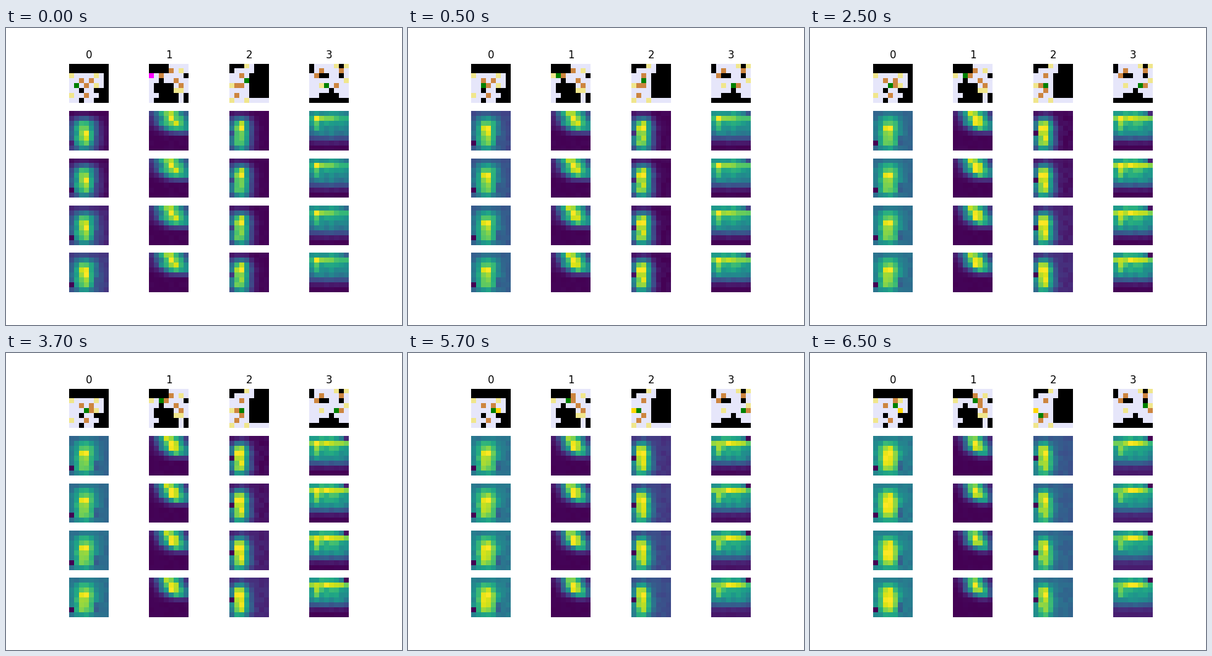
A matplotlib script that plays this animation: 640x480 px, repeating every 8000 ms.

```python
import numpy as np
import matplotlib.pyplot as plt
from matplotlib.animation import FuncAnimation
from matplotlib.colors import to_rgb

SIZE = 8
LAYERS = 4
STATES = 5
LAST_STEP = STATES * LAYERS - 1
INTERVAL = 500
MOVES = {"U": (-1, 0), "D": (1, 0), "L": (0, -1), "R": (0, 1)}
ROWS, COLS = np.mgrid[:SIZE, :SIZE]

# Walls are (row, row end, col, col end); cells are written as row * 10 + col.
LEVELS = [
    dict(walls=[(0, 2, 0, 8), (2, 8, 7, 8), (5, 8, 6, 7), (5, 6, 5, 6),
                (7, 8, 5, 6), (5, 6, 2, 3), (7, 8, 2, 3)],
         boxes=[32, 34, 43, 63], goals=[20, 25, 45, 60], player=41, moves="RRRU"),
    dict(walls=[(0, 2, 0, 4), (2, 3, 7, 8), (3, 4, 2, 3), (4, 6, 1, 2),
                (4, 8, 2, 5), (6, 8, 5, 6), (7, 8, 1, 2), (6, 8, 7, 8)],
         boxes=[14, 22, 35, 46], goals=[20, 16, 55, 56], player=20, moves="RRRR"),
    dict(walls=[(0, 1, 0, 3), (1, 2, 0, 1), (0, 2, 5, 8), (2, 7, 4, 8)],
         boxes=[22, 41, 42, 61], goals=[3, 40, 70, 73], player=33, moves="LDLD"),
    dict(walls=[(0, 2, 0, 1), (0, 1, 6, 7), (2, 3, 2, 4), (2, 3, 6, 7),
                (5, 6, 4, 5), (6, 7, 2, 6), (7, 8, 0, 8)],
         boxes=[12, 16, 21, 45], goals=[5, 7, 37, 42], player=43, moves="RRRU"),
]

# A heat map is a floor plus soft blobs, all drifting from a start to an end.
# Blob: (height, row, col, row spread, col spread).
FIELDS = [
    dict(ease=4, slant=0, floor=(.05, .33), blobs=[
        ((.85, 4.2, 2.5, 3.2, 2.5), (.52, 3.9, 2.7, 3.2, 2)),
        ((.15, 4.2, 3, .9, .9), (.12, 3, 2.4, .9, .9)),
        ((-.05, 5.5, 5, 1.2, .6), (-.2, 5.5, 5, 1.2, .6)),
        ((-.2, 6, 0, .6, .4), (-.44, 6, 0, .6, .4))]),
    dict(ease=1.5, slant=.5, floor=(.1, .06), blobs=[
        ((.78, 1.2, 4.4, 2.6, 3.2), (.75, 1.2, 4.4, 2.3, 2.2)),
        ((.12, 1.2, 4, 1.5, .8), (.2, 1.2, 3.9, 1.4, .8)),
        ((.1, 2, 2, .6, .8), (.15, 2, 2.4, .6, .8))]),
    dict(ease=1, slant=0, floor=(.06, .33), blobs=[
        ((.8, 4.2, 1.7, 3.4, 2), (.52, 4.2, 1.7, 3.4, 1.7)),
        ((.18, 2.6, 1.8, 1, .8), (.15, 2.5, 1.4, 1, .8)),
        ((-.15, 4, 0, .6, .4), (-.52, 4, 0, .6, .4))]),
    dict(ease=2, slant=0, floor=(.06, .06), blobs=[
        ((.53, 1.8, 3.5, 3.6, 9), (.5, 1.8, 3.5, 3.4, 9)),
        ((.28, 1, 3.5, .9, 9), (.28, 1, 3.5, .9, 9)),
        ((.3, 2, 1, 1.6, .7), (.18, 2.5, 1, 1.4, .7)),
        ((.05, 1, 2.5, .8, 1.2), (.12, 1, 3.5, .8, 1.2)),
        ((-.05, 0, 7.2, .8, 1), (-.55, 0, 7.2, .8, 1))]),
]


def play(level, count):
    """Walk the player, pushing any box in the way."""
    row, col = divmod(level["player"], 10)
    boxes = {divmod(cell, 10) for cell in level["boxes"]}
    for move in level["moves"][:count]:
        dr, dc = MOVES[move]
        row, col = row + dr, col + dc
        if (row, col) in boxes:
            boxes.remove((row, col))
            boxes.add((row + dr, col + dc))
    return (row, col), boxes


def draw_level(level, count):
    image = np.empty((SIZE, SIZE, 3))
    image[:] = to_rgb("lavender")
    for top, bottom, left, right in level["walls"]:
        image[top:bottom, left:right] = to_rgb("black")
    goals = {divmod(cell, 10) for cell in level["goals"]}
    player, boxes = play(level, count)
    for cell in goals:
        image[cell] = to_rgb("khaki")
    for cell in boxes:
        image[cell] = to_rgb("gold" if cell in goals else "peru")
    image[player] = to_rgb("magenta" if player in goals else "green")
    return image


def blob(height, row, col, row_spread, col_spread, slant):
    """A bump with a flat-topped profile down and a round one across."""
    center = col + slant * (ROWS - row)
    return height * np.exp(-((ROWS - row) / row_spread) ** 4
                           - ((COLS - center) / col_spread) ** 2)


def draw_field(field, step, seed):
    mix = 1 - (1 - step / LAST_STEP) ** field["ease"]
    start, end = field["floor"]
    values = np.full((SIZE, SIZE), start + (end - start) * mix)
    for first, last in field["blobs"]:
        shape = np.array(first) * (1 - mix) + np.array(last) * mix
        values += blob(*shape, field["slant"])
    phase = np.random.default_rng(seed).uniform(0, 2 * np.pi, (SIZE, SIZE))
    values *= 1 + .07 * np.sin(phase + step * .25)
    return (values - values.min()) / np.ptp(values)


fig, axes = plt.subplots(1 + LAYERS, len(LEVELS), figsize=(6.4, 4.8), dpi=100)
images = []
for index, column in enumerate(axes.T):
    column[0].set_title(str(index))
    images.append([ax.imshow(np.zeros((SIZE, SIZE)), cmap="viridis", vmin=0,
                             vmax=1, interpolation="nearest") for ax in column])
    for ax in column:
        ax.axis("off")


def update(frame):
    state = min((frame + 3) // 4, STATES - 1)
    for index, (board, *maps) in enumerate(images):
        board.set_data(draw_level(LEVELS[index], state))
        for layer, heat in enumerate(maps):
            heat.set_data(draw_field(FIELDS[index], state * LAYERS + layer, index))
    return [image for column in images for image in column]


anim = FuncAnimation(fig, update, frames=16, interval=INTERVAL, repeat=True,
                     repeat_delay=0, blit=False)
plt.show()
```
